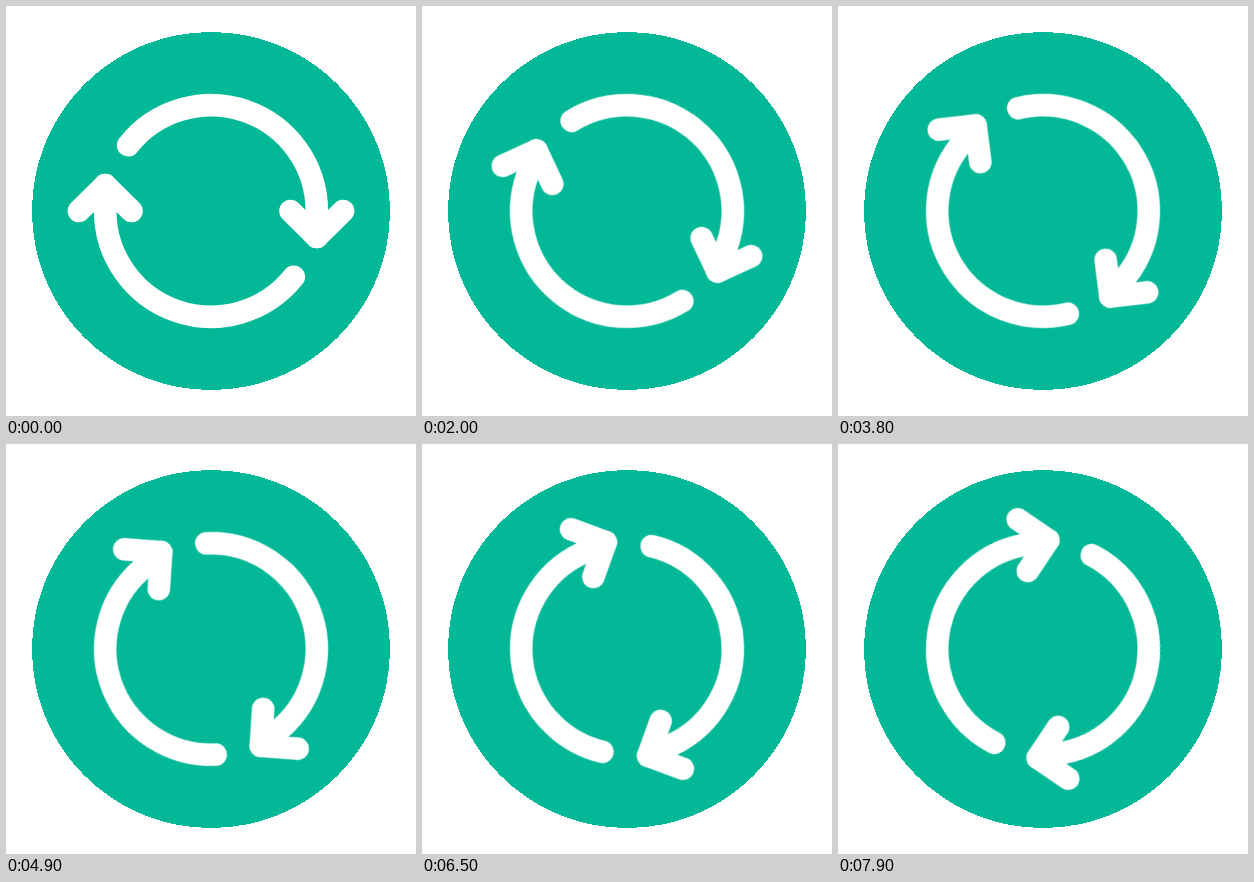
Recreate the animation shown at these times as an HTML page. Size 410x410 px, loop 8000 ms.

```html
<!DOCTYPE html>
<html lang="en">
<head>
<meta charset="utf-8">
<title>Rotating arrows</title>
<style>
  html, body { margin: 0; width: 100%; height: 100%; overflow: hidden; background: #fff; }
  svg { display: block; width: 100vw; height: 100vh; }
  .disc { fill: #02b897; shape-rendering: crispEdges; }
  .arrows {
    fill: none;
    stroke: #fff;
    stroke-width: 22.6;
    stroke-linecap: round;
    stroke-linejoin: round;
    /* one degree every 100 ms; the tiny offset keeps steps clear of rounding */
    animation: turn 8s steps(80, end) -1ms infinite;
  }
  @keyframes turn {
    from { transform: rotate(0deg); }
    to { transform: rotate(80deg); }
  }
</style>
</head>
<body>
<svg viewBox="-205 -205 410 410">
  <defs>
    <g id="arrow">
      <path d="M-82.8-65.8A105.8 105.8 0 0 1 105.8 0V26"/>
      <path d="M79.5 0L105.8 26L132.1 0"/>
    </g>
  </defs>
  <circle class="disc" r="179"/>
  <g class="arrows">
    <use href="#arrow"/>
    <use href="#arrow" transform="rotate(180)"/>
  </g>
</svg>
</body>
</html>
```
